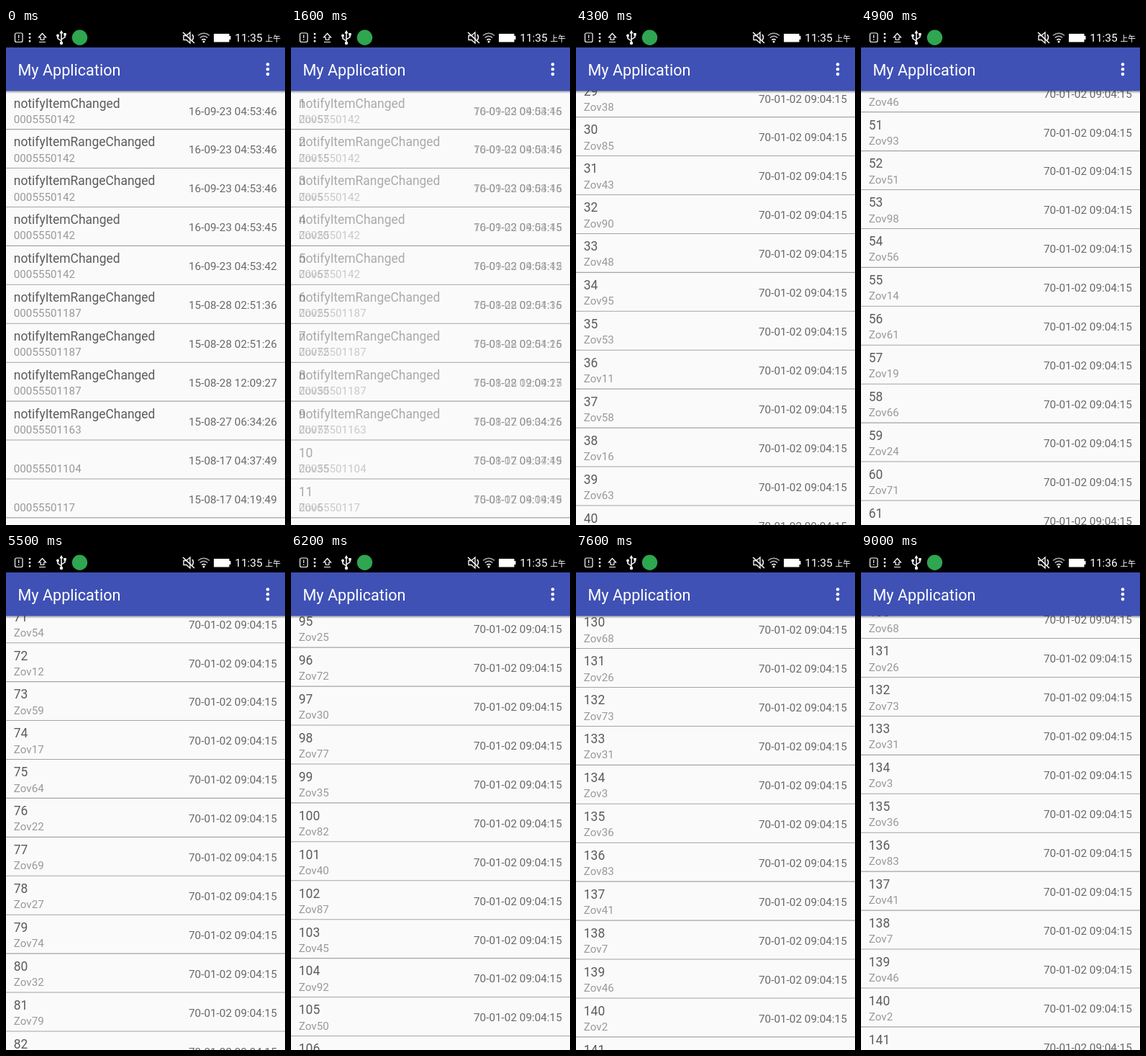
An HTML page that plays this animation: 388x690 px, repeating every 9.1 s.

```html
<!DOCTYPE html>
<html lang="en">
<head>
<meta charset="utf-8">
<title>My Application</title>
<style>
  html, body { margin: 0; width: 100%; height: 100%; overflow: hidden; background: #fafafb; }
  svg { display: block; width: 100%; height: 100%; font-family: Roboto, "Noto Sans CJK SC", "Noto Sans CJK", sans-serif; }
  .title { font-size: 17.45px; fill: #5c5c5c; }
  .name { font-size: 15.2px; fill: #999; }
  .date { font-size: 15.3px; fill: #696969; text-anchor: end; }
</style>
</head>
<body>
<svg viewBox="0 0 388 690">
  <defs>
    <linearGradient id="shade" x2="0" y2="1">
      <stop offset="0" stop-color="#000" stop-opacity=".4"/>
      <stop offset="1" stop-color="#000" stop-opacity="0"/>
    </linearGradient>
  </defs>
  <rect width="388" height="690" fill="#fafafb"/>
  <g id="lines" stroke="#a4a4a4" stroke-width="1.1"/>
  <g id="calls"/>
  <g id="items"/>

  <rect y="87" width="388" height="4" fill="url(#shade)"/>
  <rect y="27" width="388" height="60.3" fill="#3f51b5"/>
  <text x="16.5" y="66" font-size="21.6" fill="#fff">My Application</text>
  <g fill="#fff">
    <circle cx="364" cy="50.5" r="2.3"/>
    <circle cx="364" cy="57.3" r="2.3"/>
    <circle cx="364" cy="64.1" r="2.3"/>
  </g>

  <rect width="388" height="27" fill="#000"/>
  <g fill="none" stroke="#fff" stroke-width="1.2">
    <rect x="12.5" y="7" width="10.5" height="12.5" rx="2"/>
    <path d="M17.7 9.5v4.5M17.7 15.5v1.6"/>
    <path d="M33 7v2.4M33 12v2.4M33 17v2.4" stroke-width="2.4"/>
    <path d="M50.5 7.5l5 5.5h-2.7v3.5h-4.6V13h-2.7zM46 19.5h9"/>
    <path d="M77 6v15M77 18l-5-3.5V11M77 16l5-3.5V9" stroke-width="1.5"/>
  </g>
  <path d="M77 3l2.6 4.5h-5.2zM80.3 7h3.4v3.4h-3.4z" fill="#fff"/>
  <circle cx="72" cy="10.5" r="1.9" fill="#fff"/>
  <circle cx="77" cy="21" r="2.2" fill="#fff"/>
  <circle cx="102.5" cy="13.3" r="10.7" fill="#2fa650"/>
  <path d="M247 10.5h4l5-4.5v15l-5-4.5h-4z" fill="none" stroke="#fff" stroke-width="1.3"/>
  <path d="M246 6l16 15M259 9q3 4 0 8" fill="none" stroke="#fff" stroke-width="1.5"/>
  <g fill="none" stroke="#aaa" stroke-width="1.6">
    <path d="M267 10.5q8-6.5 16 0M269.7 13.6q5.3-4.3 10.6 0"/>
    <path d="M272.3 16.6q2.7-2.2 5.4 0" stroke="#fff"/>
  </g>
  <circle cx="275" cy="19" r="1.5" fill="#fff"/>
  <path d="M289 8h21.500v3h2v5h-2v3.500h-21.500z" fill="#fff"/>
  <text id="clock" x="318.2" y="19" font-size="15.5" fill="#fff">11:35</text>
  <text x="360.5" y="18.5" font-size="10.8" fill="#fff">上午</text>
</svg>
<script>
const LOOP = 9100, STEP = 100, PITCH = 53.93, TOP = 87;
const $ = id => document.getElementById(id);

function add(parent, tag, attrs, text = '') {
  const el = document.createElementNS('http://www.w3.org/2000/svg', tag);
  for (const k in attrs) el.setAttribute(k, attrs[k]);
  el.textContent = text;
  return parent.appendChild(el);
}

function addRow(parent, title = '', name = '', date = '') {
  const g = add(parent, 'g', {});
  return {
    g,
    title: add(g, 'text', { class: 'title', x: 10.8, y: 23.5 }, title),
    name: add(g, 'text', { class: 'name', x: 10.8, y: 44.7 }, name),
    date: add(g, 'text', { class: 'date', x: 376.8, y: 33.5 }, date)
  };
}

const place = (el, y) => el.setAttribute('transform', `translate(0 ${y.toFixed(2)})`);
const clamp = x => Math.min(1, Math.max(0, x));

const ONE = 'notifyItemChanged', MANY = 'notifyItemRangeChanged';
const calls = [
  [ONE, '0005550142', '16-09-23 04:53:46'],
  [MANY, '0005550142', '16-09-23 04:53:46'],
  [MANY, '0005550142', '16-09-23 04:53:46'],
  [ONE, '0005550142', '16-09-23 04:53:45'],
  [ONE, '0005550142', '16-09-23 04:53:42'],
  [MANY, '00055501187', '15-08-28 02:51:36'],
  [MANY, '00055501187', '15-08-28 02:51:26'],
  [MANY, '00055501187', '15-08-28 12:09:27'],
  [MANY, '00055501163', '15-08-27 06:34:26'],
  ['', '00055501104', '15-08-17 04:37:49'],
  ['', '0005550117', '15-08-17 04:19:49']
];
calls.forEach((c, i) => place(addRow($('calls'), ...c).g, TOP + i * PITCH));

const rows = Array.from({ length: 13 }, () => addRow($('items'), '', '', '70-01-02 09:04:15'));
const lines = rows.map(() => add($('lines'), 'path', { d: 'M0 53.6H388' }));

const short = new Set([3, 11, 127, 134, 138, 140]);
const nameOf = n => 'Zov' + (short.has(n) ? n % 7 + 2 : n * 47 % 89 + 10);

// time, offset, speed
const path = [
  [3600, 0, 0], [4300, 1527, 1.95], [5500, 3791, 1.9],
  [6800, 6279, 2.2], [7600, 6965, .03], [8600, 6979, 0]
];

function scrollAt(t) {
  if (t <= path[0][0]) return 0;
  const i = path.findIndex(p => t < p[0]);
  if (i < 0) return path[path.length - 1][1];
  const [t0, a, va] = path[i - 1], [t1, b, vb] = path[i];
  const d = t1 - t0, u = (t - t0) / d, w = 1 - u;
  return w * w * ((1 + 2 * u) * a + u * d * va) + u * u * ((1 + 2 * w) * b - w * d * vb);
}

function draw(t) {
  const mix = clamp((t - 1400) / 400);
  $('calls').setAttribute('opacity', 1 - mix);
  $('items').setAttribute('opacity', mix);

  const offset = scrollAt(t), first = Math.floor(offset / PITCH);
  rows.forEach((row, i) => {
    const n = first + i + 1, y = TOP + (n - 1) * PITCH - offset;
    row.title.textContent = n;
    row.name.textContent = nameOf(n);
    place(row.g, y);
    place(lines[i], y);
  });
  $('clock').textContent = t < 8200 ? '11:35' : '11:36';
}

function tick() {
  draw(Math.floor(performance.now() % LOOP / STEP) * STEP);
  requestAnimationFrame(tick);
}
tick();
</script>
</body>
</html>
```
